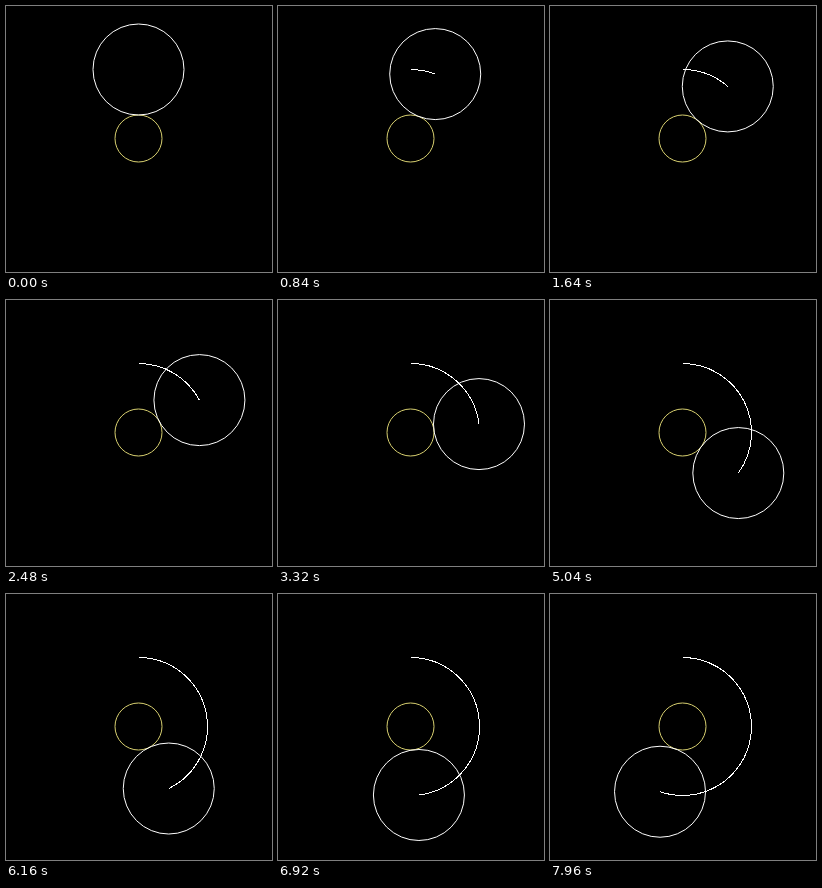
Write an HTML page that moves like this. It is 266 by 266 pixels and loops after 8000 ms.

```html
<!DOCTYPE html>
<html lang="en">
<head>
<meta charset="utf-8">
<title>Rolling circle</title>
<style>
  html, body { margin: 0; width: 100%; height: 100%; overflow: hidden; background: #000; }
  svg { display: block; width: 100%; height: 100%; fill: none; }
</style>
</head>
<body>
<svg viewBox="0 0 266 266">
  <circle id="hub" stroke="#d8d070"/>
  <circle id="wheel" stroke="#fff"/>
  <path id="trail" stroke="#fff" shape-rendering="crispEdges"/>
</svg>
<script>
  const LOOP = 8000, STEP = 40;          // one degree per step
  const C = 132.5, HUB = 23.5, WHEEL = 45.5, ORBIT = HUB + WHEEL;
  const $ = id => document.getElementById(id);
  const hub = $('hub'), wheel = $('wheel'), trail = $('trail');

  function place(circle, x, y, r) {
    circle.setAttribute('cx', x);
    circle.setAttribute('cy', y);
    circle.setAttribute('r', r);
  }

  function draw(ms) {
    const deg = Math.floor((ms % LOOP) / STEP);
    const a = deg * Math.PI / 180;
    const x = C + ORBIT * Math.sin(a);
    const y = C - ORBIT * Math.cos(a);
    place(wheel, x, y, WHEEL);
    trail.setAttribute('d', deg
      ? `M${C} ${C - ORBIT}A${ORBIT} ${ORBIT} 0 ${deg > 180 ? 1 : 0} 1 ${x} ${y}`
      : '');
  }

  place(hub, C, C, HUB);
  draw(0);
  const start = performance.now();
  function tick() {
    draw(performance.now() - start);
    requestAnimationFrame(tick);
  }
  requestAnimationFrame(tick);
</script>
</body>
</html>
```
